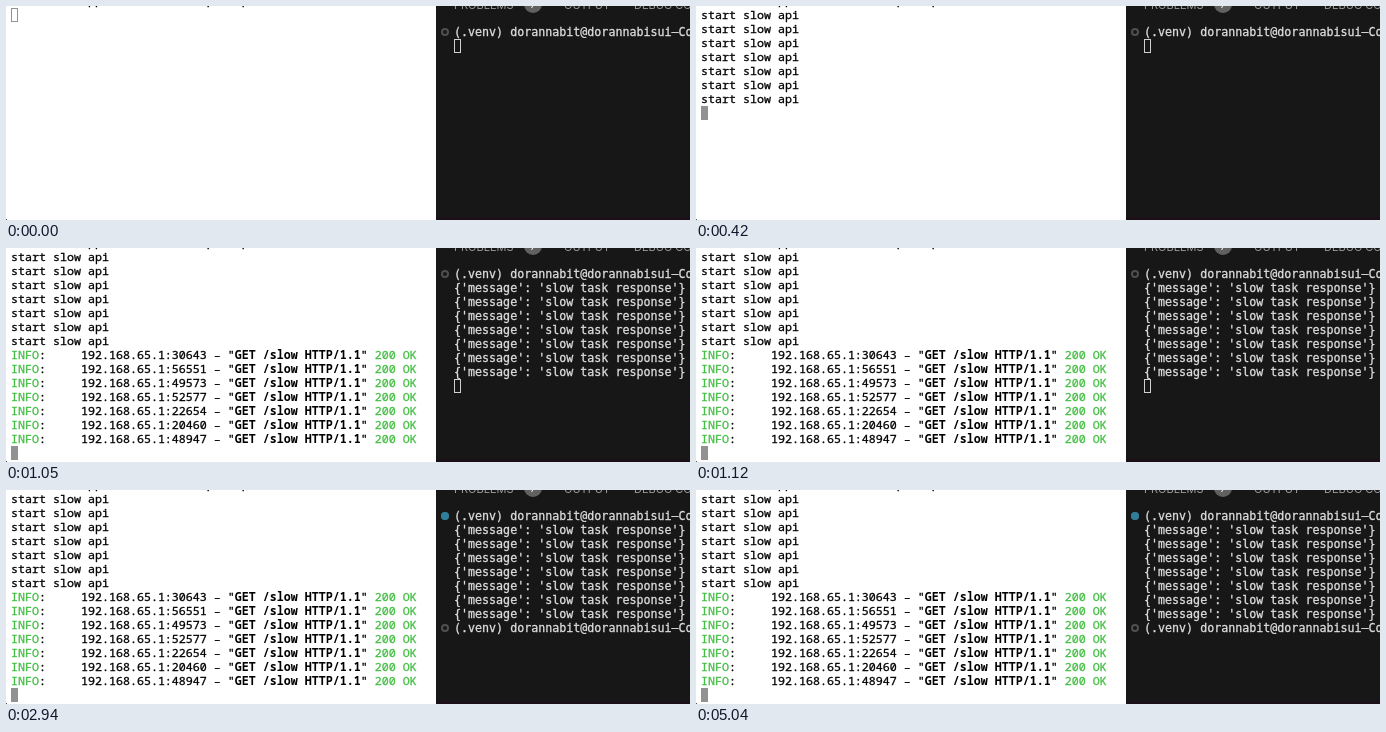
An HTML page for the animation above (5.11 s loop, 684 px wide and 214 px high).

```html
<!DOCTYPE html>
<html lang="en">
<head>
<meta charset="utf-8">
<title>Slow API calls</title>
<style>
  html, body { margin: 0; width: 100%; height: 100%; overflow: hidden; background: #fff; }
  #stage { position: relative; width: 684px; height: 214px; overflow: hidden; background: #fff; }
  #stage * { position: absolute; box-sizing: border-box; }
  #stage pre { margin: 0; white-space: pre; line-height: 14px; font-size: 11.667px; font-kerning: none;
               -webkit-text-stroke: 0.3px; }
  #stage pre * { position: static; }

  .server { left: 5px; color: #000; font-family: "Noto Sans Mono", "DejaVu Sans Mono", monospace; }
  .server i { font-style: normal; color: #45bf45; }
  .server b { -webkit-text-stroke: 0; }
  .corner { left: 0; top: 213px; width: 1px; height: 1px; background: #555; }

  .panel { left: 430px; top: 0; width: 254px; height: 214px; overflow: hidden; background: #171717; }
  .panel pre { left: 18px; color: #dedede; font-family: "DejaVu Sans Mono", monospace; }
  .edge { left: 0; top: 211px; width: 254px; height: 3px; background: #1b1018; }
  .tab { top: -8px; font: 11px/14px Inter, sans-serif; color: #9a9a9a; white-space: nowrap; }
  .badge { left: 88px; top: -11px; width: 18px; height: 18px; border-radius: 50%; background: #616161;
           font: 11px/18px Inter, sans-serif; color: #f4f4f4; text-align: center; }
  .mark { left: 5px; width: 8px; height: 8px; border: 2px solid #4f4f4f; border-radius: 50%; }
  .done { background: #2f7f9c; border-color: #2f7f9c; }

  .cursor { width: 7px; height: 14px; border: 1px solid #929292; }
  .cursor.left { left: 5px; top: 2px; }
  .cursor.right { left: 18px; top: 33px; border-color: #cfcfcf; }

  .requests, .first, .replies, .end, .cursor { animation: 5110ms step-end infinite; }
  .requests { animation-name: requests; }
  .first { animation-name: first; }
  .replies { animation-name: replies; }
  .end { animation-name: end; }
  .cursor.left { animation-name: leftCursor; }
  .cursor.right { animation-name: rightCursor; }

  @keyframes requests { 0% { opacity: 0 } 8.21%, 100% { opacity: 1 } }
  @keyframes first { 0% { opacity: 0 } 19.17%, 100% { opacity: 1 } }
  @keyframes replies { 0% { opacity: 0 } 20.54%, 100% { opacity: 1 } }
  @keyframes end { 0% { opacity: 0 } 49.31%, 100% { opacity: 1 } }
  @keyframes leftCursor {
    0% { top: 2px; background: #fff }
    1.36% { top: 2px; background: #929292 }
    8.21% { top: 100px; background: #929292 }
    20.54%, 100% { top: 198px; background: #929292 }
  }
  @keyframes rightCursor {
    0% { top: 33px; opacity: 1 }
    19.17% { top: 47px; opacity: 1 }
    20.54% { top: 131px; opacity: 1 }
    49.31%, 100% { top: 131px; opacity: 0 }
  }
</style>
</head>
<body>
<div id="stage">
  <pre class="server" style="top:-13px"><i>INFO</i>:     Application startup complete.</pre>
  <pre class="server requests" id="starts" style="top:2px"></pre>
  <pre class="server replies" id="log" style="top:100px"></pre>
  <div class="cursor left"></div>
  <div class="corner"></div>

  <div class="panel">
    <div class="tab" style="left:18px">PROBLEMS</div>
    <div class="badge">7</div>
    <div class="tab" style="left:128px">OUTPUT</div>
    <div class="tab" style="left:198px">DEBUG CONSOLE</div>
    <pre class="prompt" style="top:19px"></pre>
    <pre class="first" id="first" style="top:33px"></pre>
    <pre class="replies" id="rest" style="top:47px"></pre>
    <pre class="prompt end" style="top:131px"></pre>
    <div class="mark" style="top:22px"></div>
    <div class="mark done end" style="top:22px"></div>
    <div class="mark end" style="top:134px"></div>
    <div class="cursor right"></div>
    <div class="edge"></div>
  </div>
</div>
<script>
  const byId = id => document.getElementById(id);
  const repeat = (text, n) => Array(n).fill(text).join("\n");
  const ports = [30643, 56551, 49573, 52577, 22654, 20460, 48947];
  const reply = "{'message': 'slow task response'}";

  byId("starts").textContent = repeat("start slow api", ports.length);
  byId("log").innerHTML = ports.map(port =>
    `<i>INFO</i>:     192.168.65.1:${port} – "<b>GET /slow HTTP/1.1</b>" <i>200 OK</i>`).join("\n");
  byId("first").textContent = reply;
  byId("rest").textContent = repeat(reply, ports.length - 1);
  for (const prompt of document.querySelectorAll(".prompt"))
    prompt.textContent = "(.venv) dorannabit@dorannabisui–Co";
</script>
</body>
</html>
```
